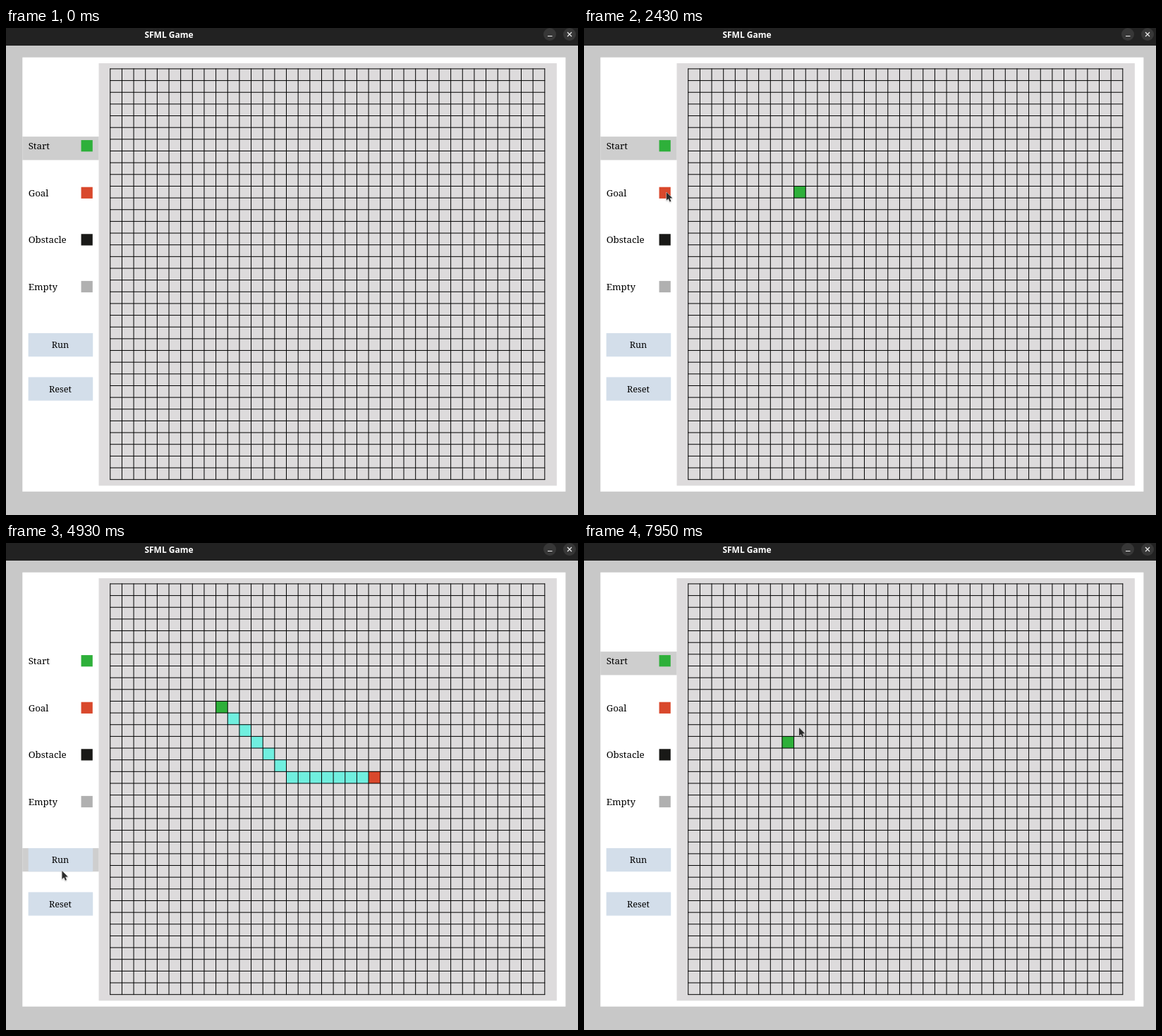
Recreate the animation shown at these times as an HTML page with a canvas. Size 811 by 691 pixels, loop 7990 ms.

```html
<!DOCTYPE html>
<html lang="en">
<head>
<meta charset="utf-8">
<title>Pathfinding grid</title>
<style>
  html, body { margin: 0; width: 100%; height: 100%; overflow: hidden; background: #c8c8c8; }
  canvas { display: block; }
</style>
</head>
<body>
<canvas id="stage" width="811" height="691"></canvas>
<script>
const ctx = document.getElementById('stage').getContext('2d');
const LOOP = 7990;

// The app panel is laid out in its own units and shown scaled down.
const PANEL = { x: 23.3, y: 41.7, scale: 0.8325 };
const COLS = 37, ROWS = 35, CELL = 20, GRID_X = 149, GRID_Y = 19;
const GREEN = '#2eb03a', RED = '#d9482c', CYAN = '#70efdf';
const MENU = [['Start', GREEN], ['Goal', RED], ['Obstacle', '#191917'], ['Empty', '#b0b0b0']];
const MENU_Y = 135, MENU_STEP = 80, RUN_Y = 470, RESET_Y = 545;

const CLICK = {
  firstStart: 1710, pickGoal: 2630, placeGoal: 3560, run: 4700,
  reset: 5785, pickStart: 6380, secondStart: 7810
};
const CLICK_LENGTH = 95, RESPONSE = 45;

// The pointer glides between rests, each move easing in and out.
const ENTRY = { at: 180, x: 694, y: 638 };
const MOVES = [
  { from: 180, to: 610, x: 117, y: 172 },
  { from: 610, to: 960, x: 315, y: 245 },
  { from: 1000, to: 1480, x: 309, y: 231 },
  { from: 1800, to: 2430, x: 117, y: 233, bend: -0.37 },
  { from: 2720, to: 3050, x: 622, y: 374 },
  { from: 3050, to: 3280, x: 534, y: 337 },
  { from: 3450, to: 3550, x: 525, y: 330 },
  { from: 3670, to: 4260, x: 63, y: 464 },
  { from: 4300, to: 4470, x: 77, y: 457 },
  { from: 4810, to: 5200, x: 88, y: 494 },
  { from: 5480, to: 5720, x: 90, y: 524 },
  { from: 5880, to: 6290, x: 108, y: 180 },
  { from: 6480, to: 6780, x: 274, y: 285 },
  { from: 7100, to: 7450, x: 288, y: 284 },
  { from: 7860, to: 7950, x: 305, y: 262 }
];

function pointerAt(t) {
  let { x, y } = ENTRY;
  for (const move of MOVES) {
    if (t < move.from) break;
    const u = Math.min(1, (t - move.from) / (move.to - move.from));
    const eased = u * u * (3 - 2 * u);
    const dx = move.x - x, dy = move.y - y;
    const side = (move.bend || 0) * Math.sin(Math.PI * eased);
    x += dx * eased - dy * side;
    y += dy * eased + dx * side;
  }
  return [x, y];
}

function rect(color, x, y, w, h) {
  ctx.fillStyle = color;
  ctx.fillRect(x, y, w, h);
}

function text(label, x, y, font, color = '#000', align = 'left') {
  ctx.font = font;
  ctx.fillStyle = color;
  ctx.textAlign = align;
  ctx.fillText(label, x, y);
}

function disc(color, x, y, r) {
  ctx.fillStyle = color;
  ctx.beginPath();
  ctx.arc(x, y, r, 0, Math.PI * 2);
  ctx.fill();
}

function fillCell(color, i, j) {
  rect(color, GRID_X + i * CELL, GRID_Y + j * CELL, CELL + 0.5, CELL + 0.5);
}

function drawTitleBar() {
  rect('#222', 0, 0, 811, 25);
  text('SFML Game', 231, 14, 'bold 12px "Noto Sans", sans-serif', '#fff', 'center');
  disc('#373737', 771, 9, 9);
  disc('#373737', 799, 9, 9);
  ctx.strokeStyle = '#eee';
  ctx.lineWidth = 1.2;
  ctx.beginPath();
  ctx.moveTo(768, 11.5); ctx.lineTo(774.5, 11.5);
  ctx.moveTo(796, 6); ctx.lineTo(802, 12);
  ctx.moveTo(802, 6); ctx.lineTo(796, 12);
  ctx.stroke();
}

function drawButton(label, y) {
  rect('#d3deea', 10, y, 110, 40);
  text(label, 64.5, y + 25.5, '15.2px "Noto Serif", serif', '#000', 'center');
}

function drawMenu(selectedY) {
  rect('#cecece', 0, selectedY, 130, 40);
  MENU.forEach(([label, color], k) => {
    const y = MENU_Y + k * MENU_STEP;
    text(label, 10, y + 21.5, '16px "Noto Serif", serif');
    rect(color, 100, y + 6, 19.5, 19.5);
  });
  drawButton('Run', RUN_Y);
  drawButton('Reset', RESET_Y);
}

function drawCells(t) {
  if (t < CLICK.reset) {
    if (t >= CLICK.firstStart) fillCell(GREEN, 9, 10);
    if (t >= CLICK.placeGoal) fillCell(RED, 22, 16);
    if (t >= CLICK.run) {
      // Diagonal steps down to the goal's row, then straight across.
      for (let i = 10; i < 22; i++) fillCell(CYAN, i, Math.min(i + 1, 16));
    }
  }
  if (t >= CLICK.secondStart) fillCell(GREEN, 8, 13);
}

function drawGrid() {
  const line = 1.2;
  for (let i = 0; i <= COLS; i++) {
    rect('#000', GRID_X - 0.1 + i * CELL, GRID_Y, line, ROWS * CELL + 1);
  }
  for (let j = 0; j <= ROWS; j++) {
    rect('#000', GRID_X, GRID_Y - 0.1 + j * CELL, COLS * CELL + 1, line);
  }
}

function selectedRow(t) {
  if (t < CLICK.pickGoal || t >= CLICK.pickStart) return MENU_Y;
  if (t < CLICK.run) return MENU_Y + MENU_STEP;
  return t < CLICK.reset ? RUN_Y : RESET_Y;
}

function drawPanel(t) {
  ctx.save();
  ctx.translate(PANEL.x, PANEL.y);
  ctx.scale(PANEL.scale, PANEL.scale);
  rect('#fff', 0, 0, 925, 740);
  rect('#dddbdc', 130, 10, 780, 720);
  drawMenu(selectedRow(t));
  drawCells(t);
  drawGrid();
  ctx.restore();
}

function drawPointer(x, y, pressed) {
  ctx.save();
  ctx.translate(x, y);
  ctx.beginPath();
  [[0, 0], [0, 11.5], [2.7, 9.2], [4.6, 13.5], [6.4, 12.7], [4.6, 8.5], [8.2, 8.2]]
    .forEach(point => ctx.lineTo(...point));
  ctx.closePath();
  ctx.shadowColor = 'rgba(0,0,0,.3)';
  ctx.shadowBlur = 2;
  ctx.shadowOffsetY = 1;
  ctx.strokeStyle = '#e4e4e4';
  ctx.lineWidth = 1;
  ctx.stroke();
  ctx.shadowColor = 'transparent';
  ctx.fillStyle = '#2b2b2b';
  ctx.fill();
  if (pressed) disc('rgba(239,236,20,.68)', 0, 0, 10);
  ctx.restore();
}

function draw(t) {
  rect('#c8c8c8', 0, 0, 811, 691);
  drawTitleBar();
  drawPanel(t - RESPONSE);
  if (t >= ENTRY.at) {
    const pressed = Object.values(CLICK).some(c => t >= c && t < c + CLICK_LENGTH);
    drawPointer(...pointerAt(t), pressed);
  }
}

let began;
function tick(now) {
  began ??= now;
  draw((now - began) % LOOP);
  requestAnimationFrame(tick);
}
draw(0);
requestAnimationFrame(tick);
</script>
</body>
</html>
```
